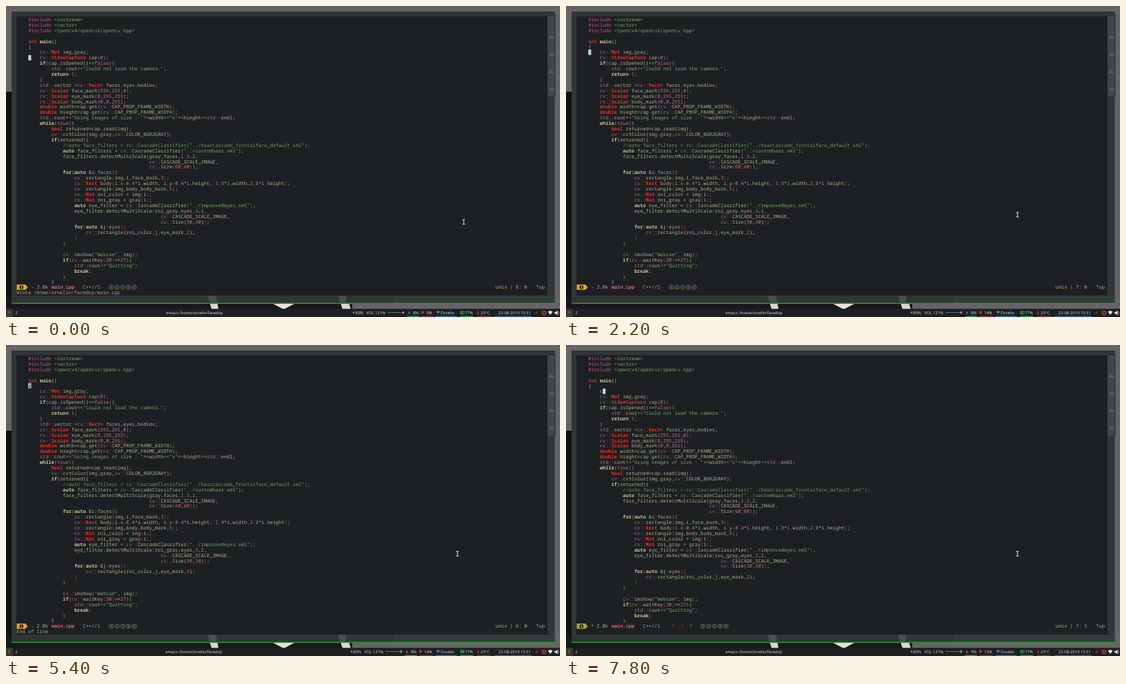
Write an HTML page that moves like this. It is 800 px wide and 450 px high and loops after 8 s.

```html
<!DOCTYPE html>
<html lang="en">
<head>
<meta charset="utf-8">
<title>Editor session</title>
<style>
html, body { margin: 0; width: 100%; height: 100%; overflow: hidden; background: #1c1f21; }
svg { display: block; width: 800px; height: 450px; }
text { white-space: pre; text-rendering: geometricPrecision; }
.mono { font: 6.93px "Noto Sans Mono", monospace; }
.bar { font: 5.85px "Noto Sans", sans-serif; fill: #cfd0cc; }
.b { font-weight: 700; }
</style>
</head>
<body>
<svg viewBox="0 0 800 450">
  <defs>
    <clipPath id="view"><rect x="15" y="15" width="767" height="387.8"/></clipPath>
  </defs>
  <g id="desk"></g>
  <g id="code" class="mono" clip-path="url(#view)"></g>
  <g id="live" class="mono"></g>
  <g id="panel" class="bar"></g>
  <g id="mouse" fill="none" stroke="#e6e6e6" stroke-width="1">
    <path d="M-1.8 -3.3H1.8M0 -3.3V3.3M-1.8 3.3H1.8"/>
  </g>
</svg>
<script>
const LOOP = 8000, CW = 4.158, RH = 7.906, X0 = 32.2, Y0 = 22;
const C = {
  plain: '#b3a98e', word: '#c3c39b', type: '#e92c27', space: '#ae7189',
  text: '#7ba56d', note: '#719260', pre: '#b9587c', num: '#bb7590',
  cursor: '#b5d9e2', yellow: '#d2b443'
};
const PAIRS = [C.yellow, '#b47b8b', '#bdb38f', '#a4a23b', '#c83a31'];
const SRC = `#include <iostream>
#include <vector>
#include <opencv4/opencv2/opencv.hpp>

int main()
{
    cv::Mat img,gray;
    cv::VideoCapture cap(0);
    if(cap.isOpened()==false){
        std::cout<<"Could not load the camera.";
        return 1;
    }
    std::vector <cv::Rect> faces,eyes,bodies;
    cv::Scalar face_mark(255,255,0);
    cv::Scalar eye_mark(0,255,255);
    cv::Scalar body_mark(0,0,255);
    double width=cap.get(cv::CAP_PROP_FRAME_WIDTH);
    double hieght=cap.get(cv::CAP_PROP_FRAME_WIDTH);
    std::cout<<"Using images of size : "<<width<<"x"<<hieght<<std::endl;
    while(true){
        bool returned=cap.read(img);
        cv::cvtColor(img,gray,cv::COLOR_BGR2GRAY);
        if(returned){
            //auto face_filters = cv::CascadeClassifier("../haarcascade_frontalface_default.xml");
            auto face_filters = cv::CascadeClassifier("../customhaar.xml");
            face_filters.detectMultiScale(gray,faces,1.3,2,
                                          cv::CASCADE_SCALE_IMAGE,
                                          cv::Size(60,60));
            for(auto &i:faces){
                cv::rectangle(img,i,face_mark,3);
                cv::Rect body(i.x-0.4*i.width, i.y-0.4*i.height, 1.8*i.width,2.8*i.height);
                cv::rectangle(img,body,body_mark,5);
                cv::Mat roi_color = img(i);
                cv::Mat roi_gray = gray(i);
                auto eye_filter = cv::CascadeClassifier("../improvedeyes.xml");
                eye_filter.detectMultiScale(roi_gray,eyes,3,2,
                                              cv::CASCADE_SCALE_IMAGE,
                                              cv::Size(30,30));
                for(auto &j:eyes){
                    cv::rectangle(roi_color,j,eye_mark,2);
                }
            }

            cv::imshow("Webcam", img);
            if(cv::waitKey(30)==27){
                std::cout<<"Quitting";
                break;
            }
        }`.split('\n');

const $ = id => document.getElementById(id);
const esc = s => s.replace(/&/g, '&amp;').replace(/</g, '&lt;');
const rect = (x, y, w, h, fill, more = '') =>
  `<rect x="${x}" y="${y}" width="${w}" height="${h}" fill="${fill}" ${more}/>`;
const path = (d, fill, more = '') => `<path d="${d}" fill="${fill}" ${more}/>`;
const text = (x, y, s, fill, cls = '') =>
  `<text x="${x}" y="${y}" class="${cls}"${fill ? ` fill="${fill}"` : ''}>${esc(s)}</text>`;
const rowY = row => Y0 + row * RH;
const colX = col => X0 + col * CW;

// Syntax colouring
const TOKEN = /\/\/.*|"[^"]*"|#include|<[a-z0-9\/.]+>|\d[\d.]*|\w+|::|[(){}]|[^\w]/g;
const TYPES = /^(int|bool|double|Mat|VideoCapture|Scalar|Rect)$/;
const WORDS = /^(if|while|for|return|break|auto)$/;
let depth = 0;

function style(tok) {
  if (tok.startsWith('//')) return [C.note];
  if (/^("|<[a-z])/.test(tok)) return [C.text];
  if (tok === '#include') return [C.pre];
  if (tok === '::') return ['#cb4f49'];
  if (/^(cv|std)$/.test(tok)) return [C.space];
  if (TYPES.test(tok)) return [C.type, 'b'];
  if (WORDS.test(tok) || tok === 'main') return [C.word, 'b'];
  if (/^(\d|true|false)/.test(tok)) return [C.num];
  if (/[({]/.test(tok)) return [PAIRS[depth++ % 5]];
  if (/[)}]/.test(tok)) return [PAIRS[--depth % 5]];
  return [C.plain];
}

function codeLine(line, row) {
  const body = line.trimStart();
  const spans = (body.match(TOKEN) || []).map(tok => {
    const [fill, cls = ''] = style(tok);
    return `<tspan fill="${fill}" class="${cls}">${esc(tok)}</tspan>`;
  });
  return `<text x="${colX(line.length - body.length)}" y="${rowY(row)}">${spans.join('')}</text>`;
}

function drawCode() {
  const rows = SRC.map(codeLine);
  $('code').innerHTML = `<g>${rows.slice(0, 6).join('')}</g><g id="rest">${rows.slice(6).join('')}</g>`;
}

function drawDesk() {
  let s = rect(0, 0, 800, 450, '#646466') + rect(0, 124, 9, 315, '#111214');
  s += rect(0, 419, 500, 20, '#17181a');
  s += path('M291 419H303L307 439H297ZM480 419H492L498 439H486Z', '#d8d7d3');
  s += path('M384 430H418L401 439Z', '#e9e3d5');
  s += rect(8, 8, 784.5, 423, '#303536');
  s += rect(782, 15, 10.5, 116, '#414648') + rect(792, 12, 1.5, 119, '#313335');
  for (let i = 0; i < 4; i++)
    s += path(`M784 ${47 + i * 25}l3 -5l2 3l2 -2v4Z`, '#565b5c');
  s += path('M291 419.5H303L305 429H294ZM480 419.5H492L490 429H482Z', '#4a4e4f');
  s += rect(560, 419, 232, 11, '#363b3c');
  s += rect(8, 429.6, 784, 1.3, '#28a52b');
  s += rect(15, 15, 767, 404, '#1d2022');
  s += rect(0, 438.2, 800, 11.8, '#1c2023');
  $('desk').innerHTML = s;
}

// Each entry changes part of the picture at its time
const STEPS = [
  [0, { row: 7, col: 0, echo: 'Wrote /home/orvelin/facedsp/main.cpp', insert: false, pair: false,
        typed: '', cpu: 8, mem: 9, mx: 661, my: 312.5, charge: 3 }],
  [200, { mx: 659, my: 310 }],
  [400, { mx: 654, my: 304 }],
  [600, { mx: 652, my: 302, mem: 14 }],
  [1000, { row: 6, echo: '' }],
  [1200, { row: 5 }],
  [1600, { echo: 'Matches: }' }],
  [2000, { row: 6, echo: '' }],
  [2400, { mem: 13 }],
  [3200, { row: 5 }],
  [3400, { mem: 14 }],
  [3600, { echo: 'Matches: }' }],
  [4400, { charge: 4 }],
  [5400, { echo: 'End of line' }],
  [5600, { row: 6, col: 2, insert: true, pair: true, echo: '-- INSERT --' }],
  [6400, { pair: false, echo: '', cpu: 9, mem: 15 }],
  [6600, { col: 3 }],
  [7000, { col: 4 }],
  [7400, { charge: 3 }],
  [7800, { col: 5, typed: 'c' }]
];
const stateAt = t => Object.assign({}, ...STEPS.filter(s => s[0] <= t).map(s => s[1]));

function modeLine(s) {
  const y = rowY(49), mid = y - 2.5;
  let out = path(`M15.5 ${mid - 3.9}H28L31.5 ${mid}L28 ${mid + 3.9}H15.5Z`, s.insert ? '#aaa51e' : '#e3a326');
  out += `<circle cx="22.3" cy="${mid}" r="2.9" fill="#24231a"/>`;
  out += text(20.7, y - .5, '1', s.insert ? '#c8c43a' : '#efb43c', 'b" style="font-size:5.4px');
  out += text(36, y, (s.insert ? '*' : '-') + ' 2.0k', C.plain);
  out += text(65.7, y, 'main.cpp', '#d0657c', 'b');
  out += text(111, y, 'C++//l', C.plain);
  if (s.insert) ['#d03a31', '#d03a31', '#8aa350'].forEach((c, i) => {
    out += text(148.8 + i * 12.5, y, '·?', c);
  });
  [...'ayspe'].forEach((ch, i) => {
    const x = (s.insert ? 197.7 : 152) + i * 8.35;
    out += `<circle cx="${x}" cy="${mid}" r="3" fill="none" stroke="#a59c85" stroke-width=".6"/>`;
    out += `<text x="${x}" y="${mid + 1.3}" text-anchor="middle" style="font-size:4.4px" fill="#b3a98e">${ch}</text>`;
  });
  out += text(707, y, `unix | ${s.row + 1}: ${s.col}`, C.plain);
  return out + text(765.5, y, 'Top', C.plain);
}

function echoLine(s) {
  const y = rowY(50);
  if (!s.echo.startsWith('Matches')) return text(15.3, y, s.echo, C.plain);
  const x = 15.3 + 9 * CW;
  return text(15.3, y, 'Matches:', C.plain) + text(x, y, '}', C.yellow, 'b') +
    rect(x, y + 1, CW, .7, C.yellow);
}

function editor(s) {
  const x = colX(s.col), y = rowY(s.row);
  let out = modeLine(s) + echoLine(s);
  if (s.pair) {
    out += text(X0, rowY(5), '{', C.yellow, 'b') + rect(X0, rowY(5) + 1, CW, .7, C.yellow);
  }
  out += text(colX(4), rowY(6), s.typed, C.plain);
  out += rect(x, y - 6.3, CW, 7.7, C.cursor);
  if (s.row === 5) out += text(x, y, '{', '#263237', 'b');
  return out;
}

function panel(s) {
  const y = 445.7, d = s.mem < 10 ? 3 : 0;
  const line = (x, w, c) => rect(x, 448.7, w, 1.3, c);
  let out = rect(0, 438.2, 10, 11.8, '#393a35') + text(3.1, y, '1', '#e0bd4c') + text(13.3, y, '2');
  out += text(230.3 + d / 3, y, 'emacs /home/orvelin/facedsp');
  out += `<g transform="translate(${d} 0)">`;
  out += `<circle cx="499" cy="443.6" r="1.3" fill="#888c8c"/>`;
  out += text(501.3, y, '80%') + text(517.3, y, 'VOL 121%');
  out += rect(548, 443.2, 25, .7, '#8a9093') + rect(570, 441.8, 1, 3.6, '#d7d9d6');
  out += path('M577 445.5L579.2 441.5L581.4 445.5Z', '#cf3535');
  out += text(584.7, y, s.cpu + '%') + line(576, 17.5, '#38a06a');
  out += path('M597 442l1.7 -.8l1.7 .8v3h-3.4Z', '#cf3535') + '</g>';
  out += text(s.mem < 10 ? 607.2 : 603.9, y, s.mem + '%') + line(597 + d, 19.5 - d, '#b32e34');
  out += path('M621.5 442.2Q624 440.2 626.5 442.2L624 445.8Z', '#557fc9');
  out += text(627.6, y, 'Orvelin') + line(620.5, 30.5, '#3775c4');
  out += rect(656.5, 441.8, 5, 3.5, 'none', 'stroke="#47ad55" stroke-width=".7"');
  out += rect(657, 442.3, s.charge, 2.5, '#47ad55', 'opacity=".65"');
  out += text(662.8, y, '77%') + line(656, 18.5, '#38a74a');
  out += path('M681 441h1.3v3l1 2h-3.3l1 -2Z', '#cf3535');
  out += text(685.3, y, '25°C') + line(680, 20, '#a83239');
  out += text(711, y, '23-08-2019 15:51') + line(705, 54, '#3565a5');
  out += `<circle cx="766" cy="443.7" r="1.6" fill="#70363c"/>`;
  out += `<circle cx="777" cy="444" r="3.3" fill="#b83a35"/><circle cx="777" cy="444" r="1.8" fill="#26282a"/>`;
  out += path('M782.6 442.4Q786 439.4 789.4 442.4L786 447Z', '#e5e5e3');
  out += path('M792 442.7h2l2.4 -2.2v7l-2.4 -2.2h-2Z', '#e5e5e3');
  return out + path('M797.4 441.7q2 2.3 0 4.6', 'none', 'stroke="#e5e5e3" stroke-width=".7"');
}

let shown = '';
function draw(t) {
  const s = stateAt(t), key = JSON.stringify(s);
  if (key === shown) return;
  shown = key;
  $('rest').setAttribute('transform', `translate(0 ${s.insert ? RH : 0})`);
  $('live').innerHTML = editor(s);
  $('panel').innerHTML = panel(s);
  $('mouse').setAttribute('transform', `translate(${s.mx} ${s.my})`);
}

drawDesk();
drawCode();
const start = performance.now();
function tick(now) {
  draw(Math.max(0, now - start) % LOOP);
  requestAnimationFrame(tick);
}
draw(0);
requestAnimationFrame(tick);
</script>
</body>
</html>
```
